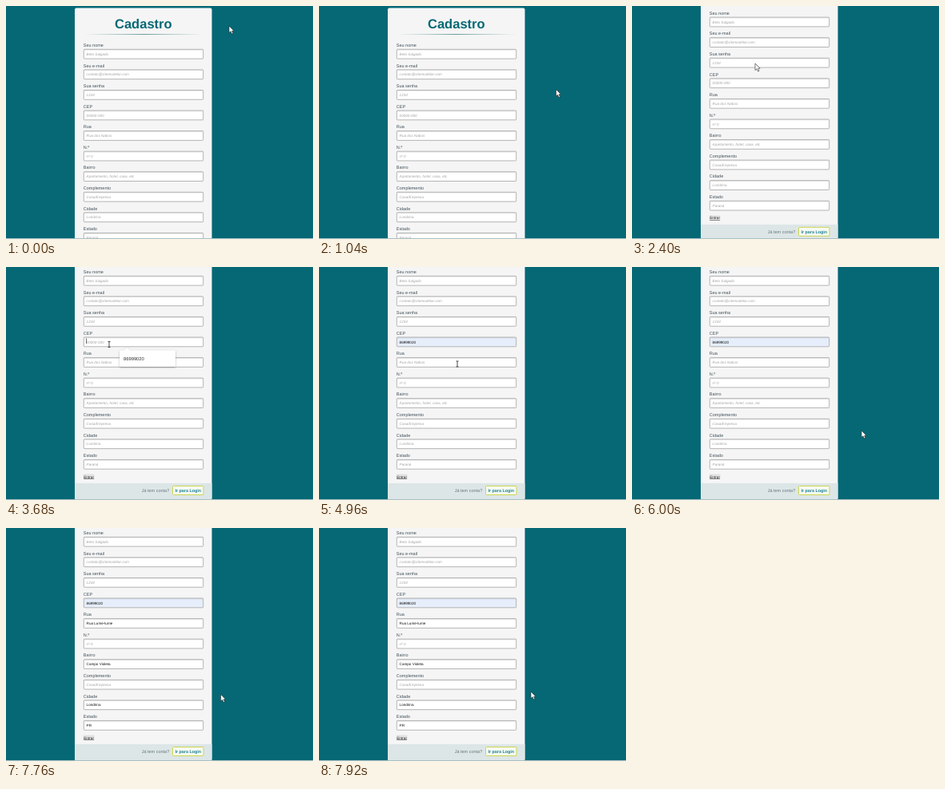
Recreate the animation shown at these times as an HTML page. Size 384 by 292 pixels, loop 8000 ms.

```html
<!DOCTYPE html>
<html lang="pt-BR">
<head>
<meta charset="utf-8">
<title>Cadastro</title>
<style>
  html, body { margin: 0; width: 100%; height: 100%; overflow: hidden; background: #066875; }
  svg { display: block; width: 100vw; height: 100vh; }
  text { font-family: "Liberation Sans", Arial, sans-serif; text-rendering: geometricPrecision; white-space: pre; }
  .title { font-size: 16.5px; font-weight: bold; fill: #066875; text-anchor: middle; }
  .label { font-size: 5.5px; fill: #405059; }
  .hint { font-size: 4.6px; font-style: italic; fill: #a3a3a3; }
  .value { font-size: 4.6px; fill: #111; }
  .field { fill: #fff; stroke: #b4b4b4; stroke-width: 1; }
  .submit { font-size: 4.7px; fill: #222; text-decoration: underline; }
  .ask { font-size: 5.5px; fill: #66767a; }
  .link { font-size: 5.4px; font-weight: bold; fill: #1d8294; text-anchor: middle; }
  .option { font-size: 5.8px; fill: #333; }
</style>
</head>
<body>
<svg viewBox="0 0 384 292" preserveAspectRatio="none">
  <defs>
    <linearGradient id="fade">
      <stop offset="0" stop-color="#7fa9a6" stop-opacity="0"/>
      <stop offset=".5" stop-color="#6b9c99"/>
      <stop offset="1" stop-color="#7fa9a6" stop-opacity="0"/>
    </linearGradient>
    <filter id="shadow" x="-20%" y="-40%" width="140%" height="190%">
      <feDropShadow dx="0" dy=".8" stdDeviation="1.2" flood-opacity=".3"/>
    </filter>
  </defs>
  <rect width="384" height="292" fill="#066875"/>
  <g id="page">
    <rect x="86" y="2.5" width="171.5" height="331.5" rx="2" fill="#f5f5f5"/>
    <text class="title" x="171.8" y="27.8">Cadastro</text>
    <rect x="97" y="35" width="150" height="1" fill="url(#fade)"/>
    <g id="form"></g>
    <rect x="96.8" y="302.5" width="13.6" height="6.5" fill="#e2e2e2"/>
    <text class="submit" x="97.2" y="307.5">Entrar</text>
    <rect x="86" y="314" width="171.5" height="20" fill="#dde6e7"/>
    <text class="ask" x="169.7" y="325">Já tem conta?</text>
    <rect x="208.5" y="317.5" width="38.5" height="11" rx="1" fill="#f6faf3" stroke="#cbd64f"/>
    <text class="link" x="227.8" y="325">Ir para Login</text>
    <rect id="caret" y="132.5" width=".6" height="6.5" fill="#111"/>
  </g>
  <g id="popup" filter="url(#shadow)">
    <path d="M143 104.500H148L151.500 101.500L155 104.500H211Q212 104.500 212 105.500V124Q212 125 211 125H143Q142 125 142 124V105.500Q142 104.500 143 104.500Z" fill="#fff"/>
    <text class="option" x="147" y="117">86999020</text>
  </g>
  <rect y="291" width="384" height="1" fill="#a9c0c3"/>
  <path id="arrow" d="M0 0V8.500L2 6.700L3.500 10L5 9.300L3.600 6.200H6.200Z" fill="#fff" stroke="#222" stroke-width=".6"/>
  <path id="beam" d="M-1.500 -3.500H1.500M0 -3.500V3.500M-1.500 3.500H1.500" fill="none" stroke="#222" stroke-width=".8"/>
</svg>
<script>
const NS = 'http://www.w3.org/2000/svg';
const LOOP = 8000, STEP = 80, PITCH = 25.57;
const OPEN = 3360, PICK = 4080, BLUR = 6640, FILL = 7440;
const byId = id => document.getElementById(id);

// label, placeholder, final value
const fields = [
  ['Seu nome', 'Beto Salgado'],
  ['Seu e-mail', 'contato@sitemodelar.com'],
  ['Sua senha', '1234'],
  ['CEP', '00000-000', '86999020'],
  ['Rua', 'Rua dos Nabos', 'Rua Lume-lume'],
  ['N.º', 'nº 0'],
  ['Bairro', 'Apartamento, hotel, casa, etc', 'Campo Violeta'],
  ['Complemento', 'Casa/Empresa'],
  ['Cidade', 'Londrina', 'Londrina'],
  ['Estado', 'Paraná', 'PR']
];
fields[6][1] = 'Apartamento, hotel, casa, etc';

function add(tag, attrs, text = '') {
  const el = document.createElementNS(NS, tag);
  for (const key in attrs) el.setAttribute(key, attrs[key]);
  el.textContent = text;
  return byId('form').appendChild(el);
}

const rows = fields.map(([label, hint, value], i) => {
  const y = i * PITCH;
  add('text', { class: 'label', x: 96.8, y: 51 + y }, label);
  const box = add('rect', { class: 'field', x: 97.3, y: 54.3 + y, width: 149.4, height: 11.8, rx: .8 });
  add('path', { d: `M97.500 ${55.1 + y}h149`, stroke: '#999', 'stroke-width': .5, opacity: .5 });
  const text = add('text', { x: 100.6, y: 61.9 + y });
  return { box, text, hint, value, fillAt: !value ? Infinity : i === 3 ? PICK : FILL };
});

// time, x, y
const path = [
  [0, 279, 25], [240, 190, 12], [400, 108, 60], [640, 130, 218], [880, 230, 112],
  [1040, 296.5, 104.5], [1280, 240, 24], [1520, 112, 55], [1760, 154, 72], [2800, 154, 72],
  [3200, 129, 97], [3680, 129, 97], [4000, 160, 115], [4480, 160, 115], [4960, 173, 121.5],
  [5200, 173, 121.5], [6000, 287, 205], [6480, 293.7, 233], [7200, 293.7, 233], [7920, 265, 205], [8000, 265, 205]
];
const scroll = [[0, 0], [1760, 0], [2080, 16], [2480, 43], [8000, 43]];

function sample(keys, t) {
  const i = Math.max(1, keys.findIndex(k => k[0] > t));
  const [a, b] = [keys[i - 1], keys[i]];
  const p = (t - a[0]) / (b[0] - a[0]);
  const eased = p * p * (3 - 2 * p);
  return a.slice(1).map((v, n) => v + (b[n + 1] - v) * eased);
}

const show = (el, on) => el.setAttribute('visibility', on ? 'visible' : 'hidden');
const move = (el, x, y) => el.setAttribute('transform', `translate(${x} ${y})`);

function draw(t) {
  const [x, y] = sample(path, t);
  move(byId('page'), 0, -sample(scroll, t)[0]);
  for (const row of rows) {
    const filled = t >= row.fillAt;
    row.text.textContent = filled ? row.value : row.hint;
    row.text.setAttribute('class', filled ? 'value' : 'hint');
  }
  rows[3].box.style.fill = t >= PICK ? '#e5eefa' : '';
  show(byId('popup'), t >= OPEN && t < PICK);
  byId('caret').setAttribute('x', t < PICK ? 100.2 : 121.2);
  show(byId('caret'), t >= OPEN && t < BLUR && (t - OPEN) % 1040 < 520);
  const typing = (t >= 3040 && t < 3760) || (t >= 4640 && t < 5440);
  show(byId('arrow'), !typing);
  show(byId('beam'), typing);
  move(byId('arrow'), x, y);
  move(byId('beam'), x, y);
}

const start = performance.now();
function tick() {
  const t = (performance.now() - start) % LOOP;
  draw(Math.floor(t / STEP) * STEP);
  requestAnimationFrame(tick);
}
draw(0);
requestAnimationFrame(tick);
</script>
</body>
</html>
```
